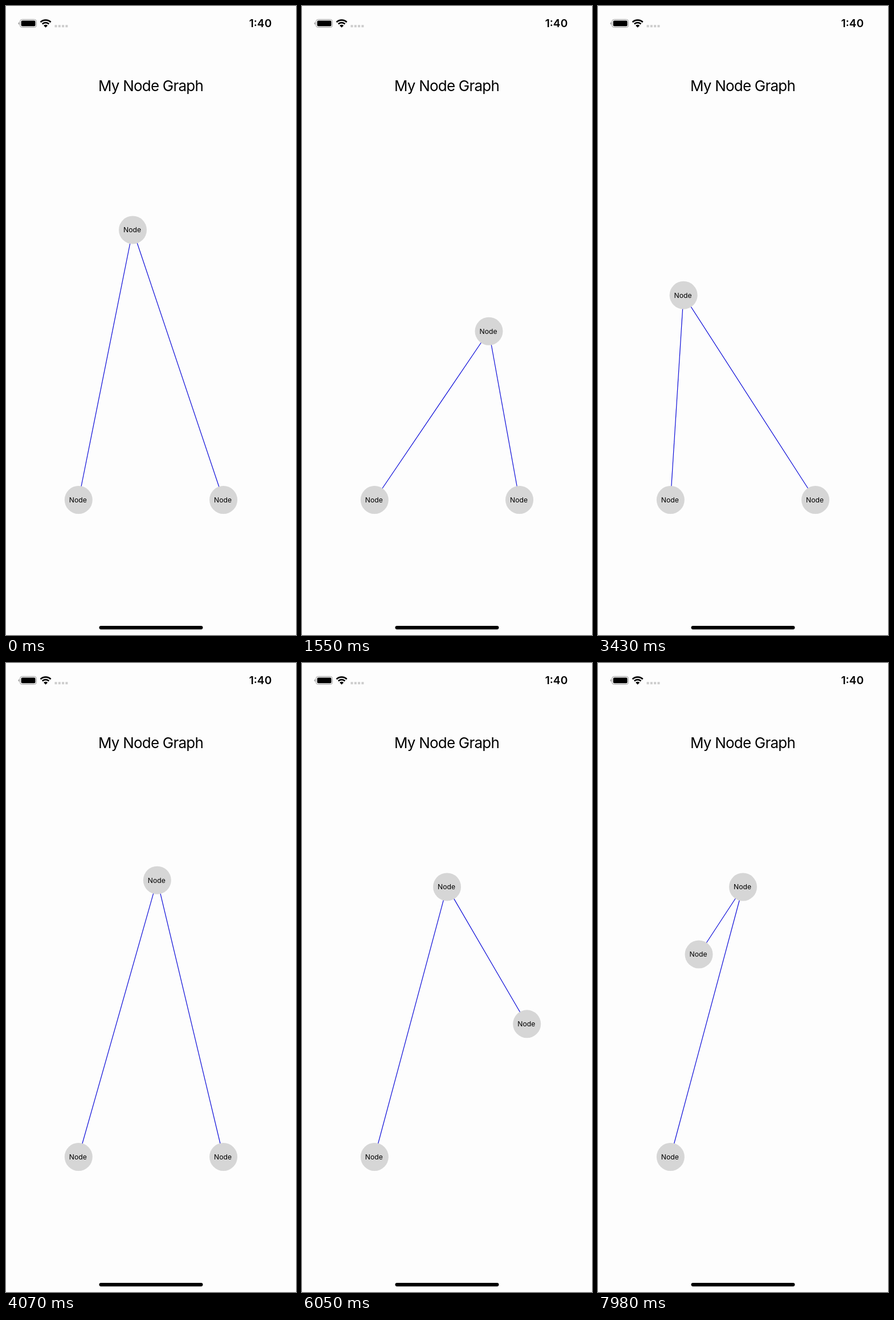
An HTML page for the animation above (8000 ms loop, 509x1101 px).

```html
<!DOCTYPE html>
<html lang="en">
<head>
<meta charset="utf-8">
<title>Node graph</title>
<style>
  html, body { margin: 0; width: 100%; height: 100%; overflow: hidden; background: #fdfdfd; }
  svg { display: block; width: 100vw; height: 100vh; font-family: Inter, sans-serif; }
  .title { font-size: 26px; letter-spacing: -.03em; text-anchor: middle; }
  .clock { font-size: 19.2px; font-weight: 600; text-anchor: end; }
  .edge { stroke: #0c0cd8; stroke-width: 1.2; }
  .node circle { fill: #d6d6d6; }
  .node text { font-size: 12.2px; text-anchor: middle; }
  .arc { fill: none; stroke: #000; stroke-width: 2.7; }
</style>
</head>
<body>
<svg viewBox="0 0 509 1101">
  <g id="battery">
    <path d="M23.2 28.2Q21.4 28.6 21.4 30.5T23.2 32.8Z" fill="#999"/>
    <rect x="24.5" y="23.5" width="29" height="14" rx="4" fill="none" stroke="#999"/>
    <rect x="26.6" y="25.5" width="25" height="10" rx="2.2"/>
  </g>
  <g id="wifi">
    <path class="arc" d="M60.6 28.2A13 13 0 0 1 78.6 28.2"/>
    <path class="arc" d="M63.8 31.4A8.4 8.4 0 0 1 75.4 31.4"/>
    <path d="M69.6 37.8L66.1 34.2A5 5 0 0 1 73.1 34.2Z"/>
  </g>
  <path d="M85.5 35.2H109" stroke="#ccc" stroke-width="4" stroke-dasharray="4 2.3"/>
  <text class="clock" x="466.3" y="37.4">1:40</text>
  <text class="title" x="254" y="148.8">My Node Graph</text>
  <line class="edge" id="edgeLeft"/>
  <line class="edge" id="edgeRight"/>
  <g class="node" id="left"><circle r="24.5"/><text x="-1" y="4.4">Node</text></g>
  <g class="node" id="right"><circle r="24.5"/><text x="-1" y="4.4">Node</text></g>
  <g class="node" id="top"><circle r="24.5"/><text x="-1" y="4.4">Node</text></g>
  <rect x="163.5" y="1085" width="182" height="6.2" rx="3.1"/>
</svg>
<script>
const LOOP = 8000;
const RELEASE = 3270;
const home = { top: [254.5, 392], left: [127.3, 864.5], right: [381.6, 864.5] };

// Drag paths: time, x, y
const topDrag = [
  [0, 222.5, 392], [800, 286, 440], [1550, 328, 569], [2100, 290, 800],
  [2490, 205, 928.5], [2820, 94, 589], [RELEASE, 90, 572]
];
const rightDrag = [
  [5500, ...home.right], [6100, 395, 610], [6750, 327, 352],
  [7400, 210, 345], [7980, 177, 510]
];

const $ = id => document.getElementById(id);
const slope = (a, b, k) => (b[k] - a[k]) / (b[0] - a[0]);

// Tangent that never overshoots a turning point
function tangent(keys, i, k) {
  if (i === 0 || i === keys.length - 1) return 0;
  const a = slope(keys[i - 1], keys[i], k);
  const b = slope(keys[i], keys[i + 1], k);
  return a * b > 0 ? 2 * a * b / (a + b) : 0;
}

function follow(keys, t) {
  const last = keys.length - 1;
  if (t <= keys[0][0]) return keys[0].slice(1);
  if (t >= keys[last][0]) return keys[last].slice(1);
  const i = keys.findIndex(key => key[0] > t) - 1;
  const a = keys[i], b = keys[i + 1];
  const d = b[0] - a[0], u = (t - a[0]) / d, v = 1 - u;
  return [1, 2].map(k =>
    a[k] * v * v * (1 + 2 * u) + b[k] * u * u * (3 - 2 * u) +
    d * u * v * (v * tangent(keys, i, k) - u * tangent(keys, i + 1, k)));
}

// Damped spring from 1 to 0, starting at rest
function spring(s) {
  const k = 2.81, w = 5.71;
  return Math.exp(-k * s) * (Math.cos(w * s) + k / w * Math.sin(w * s));
}

function topAt(t) {
  if (t < RELEASE) return follow(topDrag, t);
  const from = topDrag[topDrag.length - 1];
  const s = spring((t - RELEASE) / 1000);
  return home.top.map((h, i) => h + (from[i + 1] - h) * s);
}

const place = (id, p) => $(id).setAttribute("transform", `translate(${p})`);

function link(id, a, b) {
  const ends = { x1: a[0], y1: a[1], x2: b[0], y2: b[1] };
  for (const name in ends) $(id).setAttribute(name, ends[name]);
}

function draw(t) {
  const top = topAt(t), right = follow(rightDrag, t);
  place("top", top);
  place("right", right);
  link("edgeLeft", top, home.left);
  link("edgeRight", top, right);
}

const start = performance.now();
function tick() {
  draw((performance.now() - start) % LOOP);
  requestAnimationFrame(tick);
}
place("left", home.left);
tick();
</script>
</body>
</html>
```
